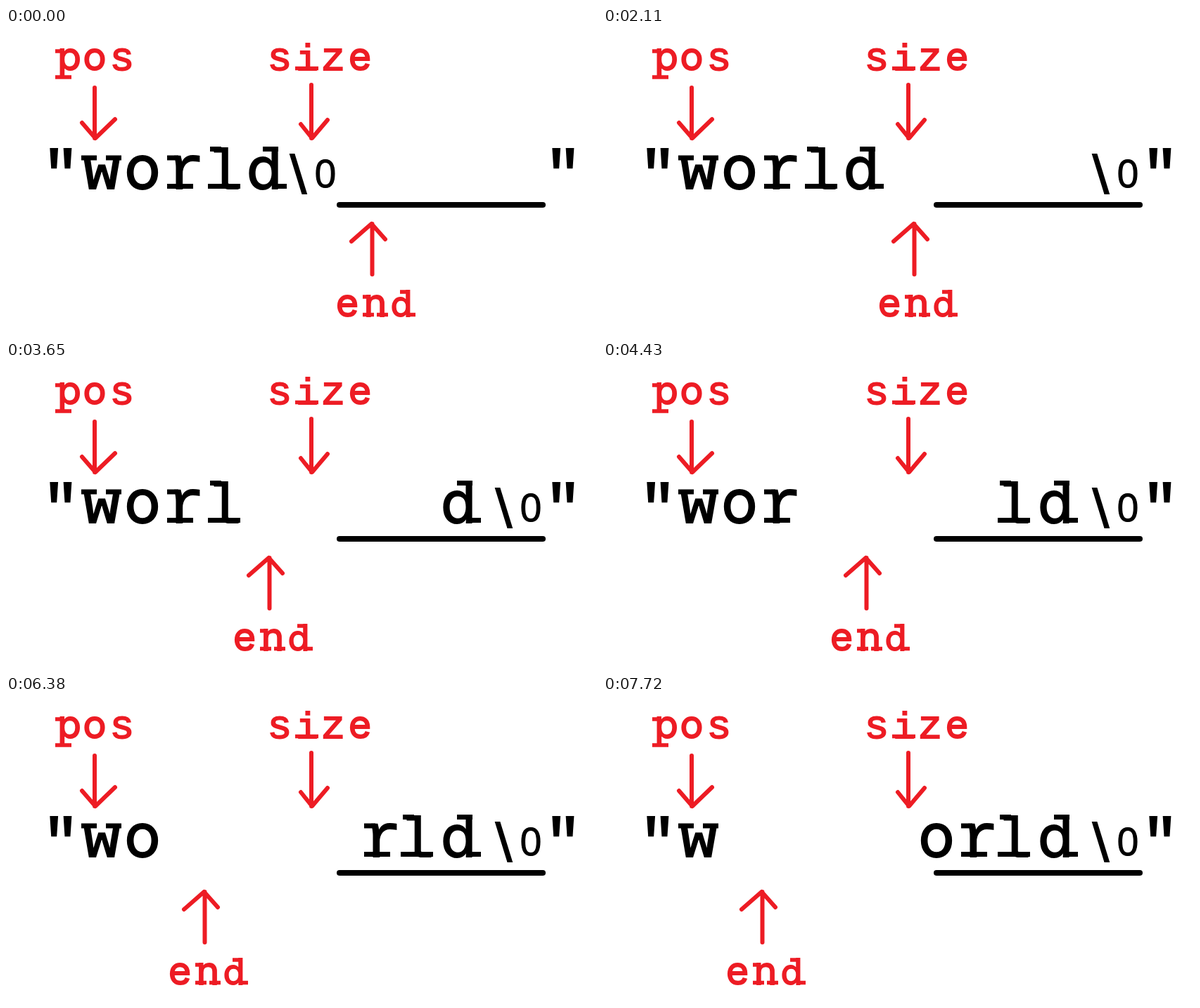
Animation of 840 by 436 pixels, one loop 8000 ms. Source, as an HTML page:

```html
<!DOCTYPE html>
<html lang="en">
<head>
<meta charset="utf-8">
<title>Shifting a string in its buffer</title>
<style>
html, body { margin: 0; width: 100%; height: 100%; overflow: hidden; background: #fff; }
svg { display: block; width: 100vw; height: 100vh; }
text { font-family: "Liberation Mono", "Courier New", monospace; text-anchor: middle; }
text.round { font-family: Inter, "DejaVu Sans", sans-serif; }
path { fill: none; }
.black text { fill: #000; stroke: #000; stroke-width: 2; }
.black path { stroke: #000; stroke-width: 7; }
.red text { fill: #ed1c24; stroke: #ed1c24; stroke-width: 1.8; }
.red path { stroke: #ed1c24; stroke-width: 5.5; }
.red path.arrow { stroke-width: 6; stroke-linecap: round; stroke-linejoin: round; }
.black path.bar { stroke-width: 8; stroke-linecap: round; }
.black text.slash { font-family: "DejaVu Sans", sans-serif; }
.black text.zero { font-family: "Open Sans", "Noto Sans", sans-serif; stroke-width: 1.2; }
</style>
</head>
<body>
<svg id="stage" viewBox="0 0 840 436"></svg>
<script>
const LOOP = 8000;
const ROUND = "odpen";
const stage = document.getElementById("stage");

function add(parent, tag, attrs, content = "") {
  const node = document.createElementNS("http://www.w3.org/2000/svg", tag);
  for (const key in attrs) node.setAttribute(key, attrs[key]);
  node.textContent = content;
  parent.append(node);
  return node;
}

const group = (cls) => add(stage, "g", { class: cls });

// One letter centred on x, with optional slab serifs
function letter(parent, char, x, y, size, slabs) {
  const cls = ROUND.includes(char) ? "round" : "plain";
  add(parent, "text", { class: cls, x, y, "font-size": size }, char);
  if (slabs) add(parent, "path", { d: slabs });
}

function arrow(parent, shaft, head) {
  add(parent, "path", { class: "arrow", d: shaft + head });
}

function bigLetter(char, x, size, slabs) {
  const g = group("black");
  letter(g, char, x, 229, size, slabs);
  return g;
}

// Labels
const pos = group("red");
letter(pos, "p", 90, 60, 55, "M70 33h12M70 70h23");
letter(pos, "o", 126, 60, 55);
letter(pos, "s", 165, 60, 58);
arrow(pos, "M126 85V157", "M108 135L127 157L155 130");

const size = group("red");
letter(size, "s", 389, 60, 58);
letter(size, "i", 428, 60, 52, "M411 57.5h33");
letter(size, "z", 465, 60, 58);
letter(size, "e", 503, 60, 55);
arrow(size, "M434 81V157", "M419 137L435 157L457 131");

const end = group("red");
letter(end, "e", 485, 411, 55);
letter(end, "n", 525, 411, 55, "M507 383h10M507 408.5h16M527 408.5h16");
letter(end, "d", 562, 411, 50, "M560 376h14M570 408.5h12");
arrow(end, "M520.5 351V279", "M491 304L519.5 279L539 301");

// Buffer
const frame = group("black");
letter(frame, '"', 78, 235, 88);
letter(frame, '"', 792, 235, 88);
add(frame, "path", { class: "bar", d: "M474 252H763" });

bigLetter("w", 136, 87, "M107 185h22M142 185h22");
const o = bigLetter("o", 194, 85);
const r = bigLetter("r", 256, 87, "M229 185h16M229 225.5h37");
const l = bigLetter("l", 310, 80, "M290 172.5h16M287 225.5h46");
const d = bigLetter("d", 367, 81, "M365 172.5h22M380 225.5h19");

const nul = group("black");
add(nul, "text", { class: "slash", x: 415.5, y: 230, "font-size": 68 }, "\\");
add(nul, "text", { class: "zero", x: 454, y: 227, "font-size": 55 }, "0");

// Each part jumps to an x offset at a set time
const moves = [
  [1360, nul, 292],
  [2110, end, -78],
  [2910, d, 276],
  [3650, end, -146],
  [4430, l, 274],
  [5050, end, -192],
  [5700, r, 280],
  [6380, end, -238],
  [7000, o, 280],
  [7720, end, -294]
];

function draw(time) {
  const offsets = new Map(moves.map(([, part]) => [part, 0]));
  for (const [at, part, dx] of moves) if (time >= at) offsets.set(part, dx);
  offsets.forEach((dx, part) => part.setAttribute("transform", `translate(${dx} 0)`));
}

const start = performance.now();
function tick() {
  draw((performance.now() - start) % LOOP);
  requestAnimationFrame(tick);
}
tick();
</script>
</body>
</html>
```
